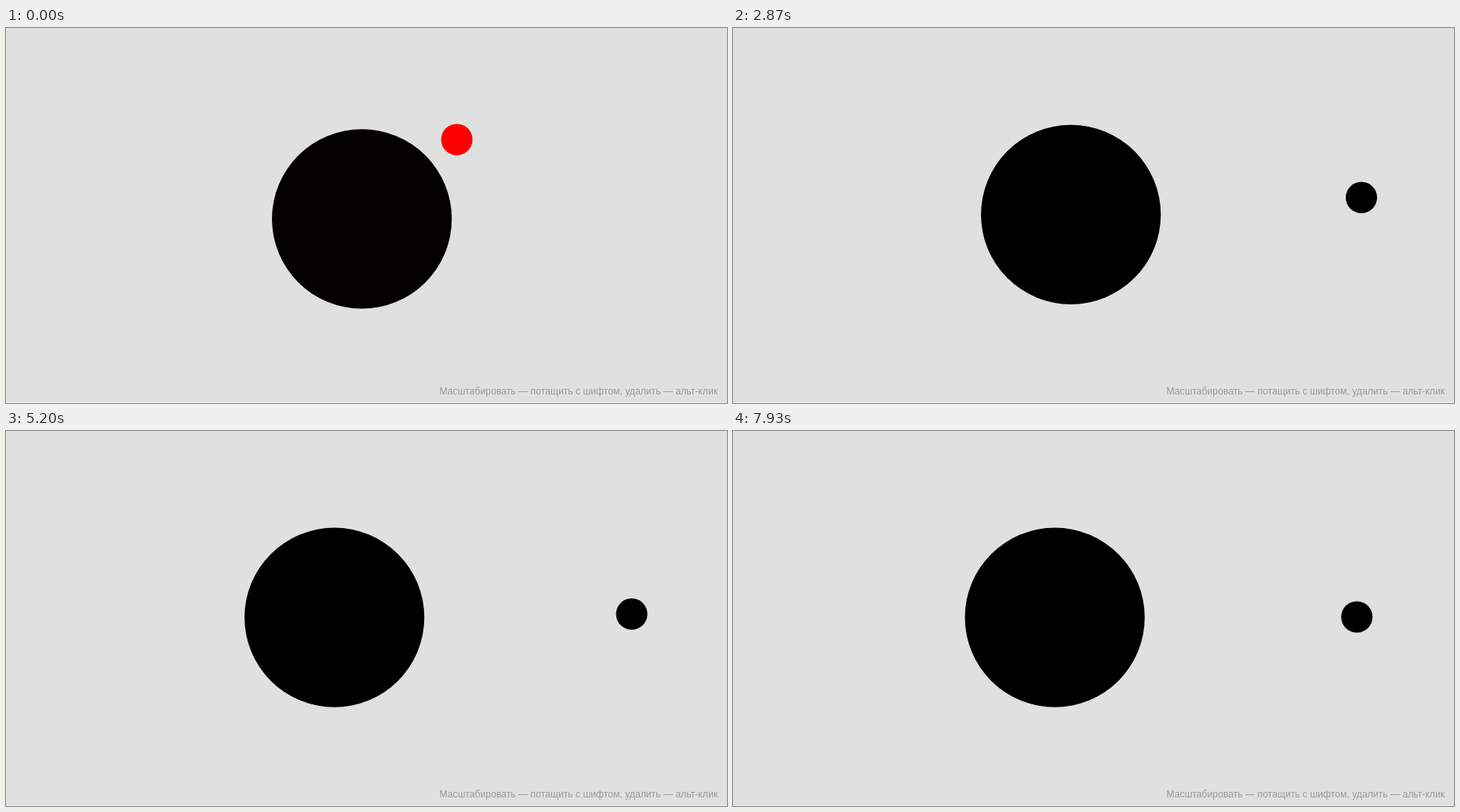
An HTML page with a canvas for the animation above (7990 ms loop, 919x479 px).

```html
<!DOCTYPE html>
<html lang="ru">
<head>
<meta charset="utf-8">
<style>
  html, body { margin: 0; width: 100%; height: 100%; overflow: hidden; background: #e0e0e0; }
  canvas { position: absolute; left: 0; top: 0; display: block; }
  p {
    position: absolute; left: 552.5px; top: 457px; margin: 0;
    font: 12.18px/14px "Liberation Sans", Arial, sans-serif;
    color: #999; white-space: nowrap;
  }
</style>
</head>
<body>
<canvas width="919" height="479"></canvas>
<p>Масштабировать — потащить с шифтом, удалить — альт-клик</p>
<script>
const ctx = document.querySelector('canvas').getContext('2d');
const LOOP = 7990, HOLD = 500, STEP = 57.1;
const MID_Y = 238.2;

const decay = (amount, rate, t) => amount * Math.exp(-rate * t);

function disc(x, y, r, red) {
  ctx.fillStyle = `rgb(${Math.round(red)}, 0, 0)`;
  ctx.beginPath();
  ctx.arc(x, y, r, 0, Math.PI * 2);
  ctx.fill();
}

// The discs push each other apart, then drift to rest on the middle line.
function draw(time) {
  const t = time < HOLD ? 0 : (Math.floor((time - HOLD) / STEP) + 1) * STEP;
  const heat = Math.min(1, Math.exp((250 - t) / 230));

  ctx.fillStyle = '#e0e0e0';
  ctx.fillRect(0, 0, 919, 479);
  ctx.fillStyle = '#f0f0f0';
  ctx.fillRect(0, 478, 919, 1);

  disc(
    399 + decay(51.8, 0.000205, t) + decay(2.8, 0.006, t),
    MID_Y + decay(7.5, 0.0017, t) - decay(1.8, 0.03, t),
    114.6, 3 * heat
  );
  disc(
    792 + decay(14.7, 0.000205, t) - decay(232.1, 0.006, t),
    MID_Y - decay(110.5, 0.00068, t) - decay(0.67 * t, 0.008, t) + decay(14.8, 0.02, t),
    20, 255 * heat
  );
}

const start = performance.now();
function tick() {
  draw((performance.now() - start) % LOOP);
  requestAnimationFrame(tick);
}
tick();
</script>
</body>
</html>
```
